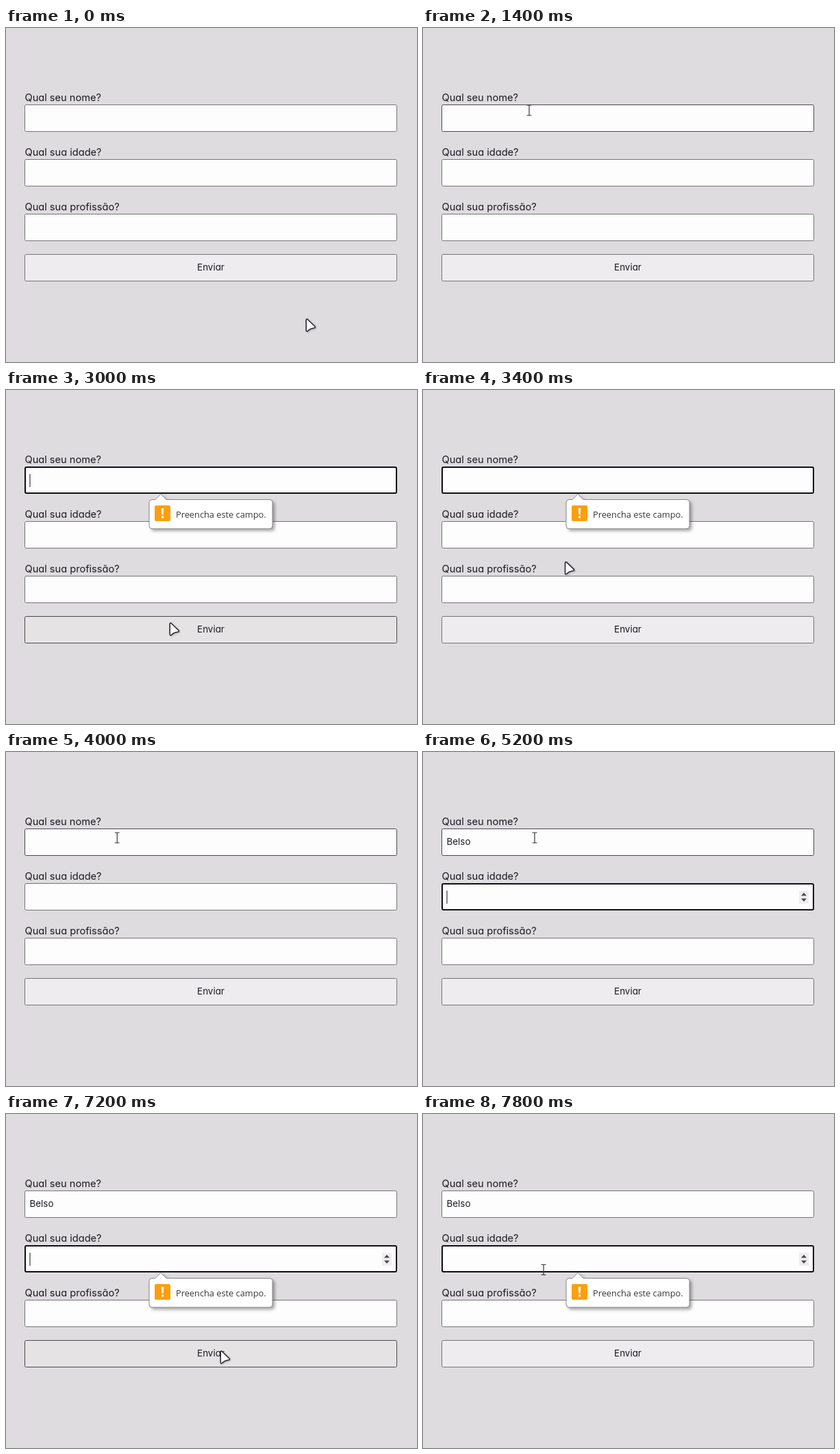
Write an HTML page that moves like this. It is 600 by 489 pixels and loops after 8 s.

```html
<!DOCTYPE html>
<html lang="pt-BR">
<head>
<meta charset="utf-8">
<title>Formulário</title>
<style>
  html, body { margin: 0; width: 100%; height: 100%; overflow: hidden; background: #dedcde; }
  svg { display: block; width: 600px; height: 489px; }
  text { font: 14.6px Inter, sans-serif; font-feature-settings: "cv11"; fill: #1b1921; }
  .small { font-size: 13.4px; }
  #tip text { font: 12.8px "Open Sans", "Noto Sans", sans-serif; fill: #38363a; }
</style>
</head>
<body>
<svg viewBox="0 0 600 489">
  <g id="form"></g>
  <text id="name" class="small" x="34.5" y="136"></text>
  <g id="spinner">
    <rect x="549" y="203" width="14" height="19" fill="#efedef"/>
    <path d="M552 210.5L556 206L560 210.5ZM552 214.5L556 219L560 214.5Z" fill="#484649"/>
  </g>
  <rect id="caret" width="1" height="19" fill="#111"/>
  <g id="tip">
    <path d="M213 160.5H218L226 152.500L234 160.500H385Q389 160.500 389 164.500V199Q389 203 385 203H213Q209 203 209 199V164.500Q209 160.500 213 160.500Z"
      fill="#fff" stroke="#8a888a" style="filter:drop-shadow(3px 3px 2px #0005)"/>
    <rect x="217" y="169" width="23" height="23" rx="2" fill="#fb9f0d"/>
    <path d="M226.700 173H230.300L229.700 182.500H227.300Z" fill="#fff"/>
    <rect x="227" y="184.500" width="3" height="3" fill="#fff"/>
    <text x="248" y="186.500">Preencha este campo.</text>
  </g>
  <path id="arrow" d="M1.200 2.500V17.500Q1.500 20 3.600 18.600Q7 14.600 12.700 14.200Q15.600 13.600 13.600 11.500L3.200 1.500Q1.500 .5 1.200 2.500Z"
    fill="#fff" stroke="#2d2b33" stroke-width="1.600" stroke-linejoin="round" style="filter:drop-shadow(1px 1px 1px #0004)"/>
  <path id="ibeam" d="M-3.500 -7.500H-1Q0 -7.500 0 -6.500Q0 -7.500 1 -7.500H3.500M0 -6.500V6.500M-3.500 7.500H-1Q0 7.500 0 6.500Q0 7.500 1 7.500H3.500"
    fill="none" stroke="#39373c" stroke-width="1.200"/>
</svg>
<script>
const LOOP = 8000, STEP = 200;
const NAME = "Belso";
const $ = id => document.getElementById(id);
const show = (id, on) => { $(id).style.display = on ? "" : "none"; };

// Top edge of each control; the last one is the button.
const tops = [112, 192, 272, 331];
const labels = ["Qual seu nome?", "Qual sua idade?", "Qual sua profissão?"];
const BUTTON = 3;

$("form").innerHTML =
  labels.map((s, i) => `<text x="27.5" y="${tops[i] - 5.5}">${s}</text>`).join("") +
  tops.map(() => "<rect/>").join("") +
  '<text class="small" x="299" y="355" text-anchor="middle">Enviar</text>';
const boxes = [...$("form").querySelectorAll("rect")];

// Pointer stops: time, x, y
const stops = [
  [0, 437, 425], [1200, 160, 129], [1400, 155, 120.5], [1600, 157, 130],
  [1800, 157, 130], [2600, 238, 340], [3000, 238, 340], [3900, 162, 125.5],
  [4200, 163, 125.5], [5600, 163, 125.5], [6200, 335, 436], [6400, 350, 410],
  [6600, 356, 373], [7000, 318, 347], [7200, 312, 346], [7800, 176, 228], [8000, 176, 228]
];

// Form states: start, focused field (-1 for none), bubble shown, caret phase origin
const states = [
  [0, -1, false, 0], [1600, 0, false, 1600], [2800, 0, true, 2800], [3600, -1, false, 0],
  [4200, 0, false, 4200], [4600, 0, false, 4600], [5200, 1, false, 5000],
  [6200, -1, false, 0], [7200, 1, true, 7200]
];

function pointerAt(t) {
  const i = stops.findIndex(s => s[0] > t);
  const [t0, x0, y0] = stops[i - 1], [t1, x1, y1] = stops[i];
  const u = (t - t0) / (t1 - t0), k = u * u * (3 - 2 * u);
  return [x0 + (x1 - x0) * k, y0 + (y1 - y0) * k];
}

function drawBox(box, i, focused, hovered) {
  const inset = focused ? 1 : 0.5;
  const attrs = {
    x: 27 + inset, y: tops[i] + inset, width: 544 - 2 * inset, height: 40 - 2 * inset, rx: 2,
    fill: i < BUTTON ? "#fefdfe" : hovered ? "#e5e3e4" : "#eeecee",
    stroke: focused ? "#100f14" : hovered ? "#4b494c" : "#767477",
    "stroke-width": 2 * inset
  };
  for (const key in attrs) box.setAttribute(key, attrs[key]);
}

function render(t) {
  const [x, y] = pointerAt(t);
  const [, focus, bubble, blink] = states.findLast(s => s[0] <= t);
  const hover = x < 27 || x > 571 ? -1 : tops.findIndex(top => y >= top && y < top + 40);
  boxes.forEach((box, i) => drawBox(box, i, i === focus, i === hover));

  const typed = t < 4600 ? 0 : Math.min(NAME.length, 1 + (t - 4600) / 100);
  $("name").textContent = NAME.slice(0, typed);

  show("spinner", focus === 1 || hover === 1);
  show("caret", focus >= 0 && (t - blink) % 1000 < 400);
  const textWidth = focus === 0 && typed ? $("name").getComputedTextLength() : 0;
  $("caret").setAttribute("x", 34.5 + textWidth);
  $("caret").setAttribute("y", tops[Math.max(focus, 0)] + 11);

  show("tip", bubble);
  $("tip").setAttribute("transform", `translate(0 ${focus === 1 ? 80 : 0})`);

  const overField = hover >= 0 && hover < BUTTON;
  show("ibeam", overField);
  show("arrow", !overField);
  $(overField ? "ibeam" : "arrow").setAttribute("transform", `translate(${x} ${y})`);
}

const start = performance.now();
function tick() {
  const t = (performance.now() - start) % LOOP;
  render(Math.floor(t / STEP) * STEP);
  requestAnimationFrame(tick);
}
tick();
</script>
</body>
</html>
```
